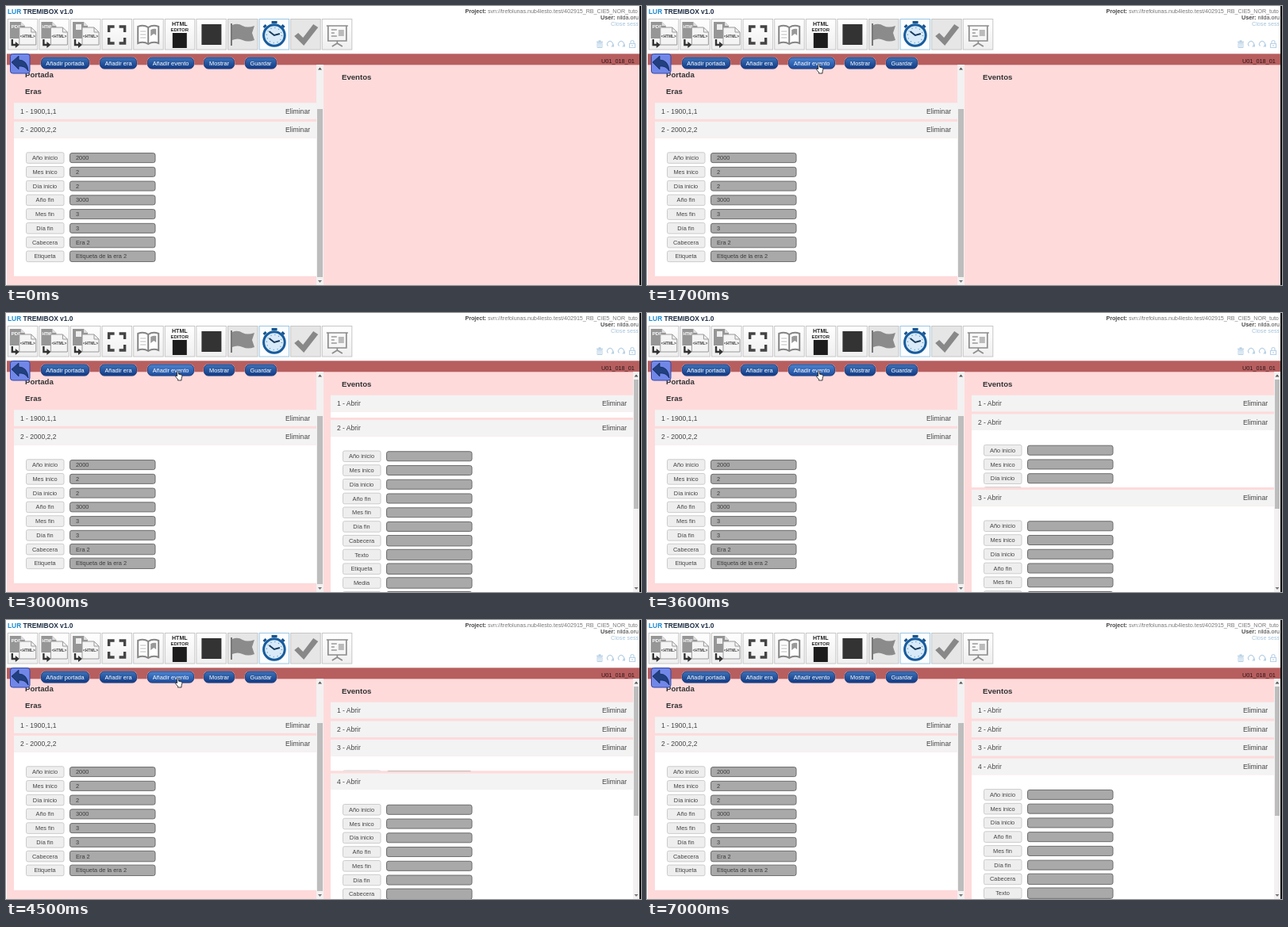
Write an HTML page that moves like this. It is 800 px wide and 352 px high and loops after 7.1 s.

```html
<!DOCTYPE html>
<html lang="es">
<head>
<meta charset="utf-8">
<title>Editor de eventos</title>
<style>
  html, body { margin: 0; width: 100%; height: 100%; overflow: hidden; background: #fff; }
  svg { font-family: "Liberation Sans", Arial, sans-serif; }
  #stage { display: block; }
</style>
</head>
<body>
<svg id="stage" width="800" height="352" viewBox="0 0 800 352">
  <defs>
    <linearGradient id="btn" x2="0" y2="1">
      <stop offset="0" stop-color="#3f73b8"/><stop offset="1" stop-color="#103a85"/>
    </linearGradient>
    <linearGradient id="hover" x2="0" y2="1">
      <stop offset="0" stop-color="#4d84d0"/><stop offset="1" stop-color="#1c4c9c"/>
    </linearGradient>
    <linearGradient id="tile" x2="0" y2="1">
      <stop offset="0" stop-color="#fff"/><stop offset="1" stop-color="#efefef"/>
    </linearGradient>
  </defs>
  <g id="base"></g>
  <g id="live"></g>
  <rect x="798" width="2" height="352" fill="#111"/>
</svg>
<script>
const LOOP = 7100;
const PITCH = 23.6, ROW = 17.75, OPEN = 245, SLIDE = 350;
const ADDED = [1740, 2729, 3455, 4269];
const DATES = ['Año inicio', 'Mes inico', 'Día inicio', 'Año fin', 'Mes fin', 'Día fin', 'Cabecera'];
const ERA = [...DATES, 'Etiqueta'];
const EVENT = [...DATES, 'Texto', 'Etiqueta', 'Media', 'Crédito', 'Leyenda'];
const PATH = [[500, 800, 320], [800, 256, 86], [1000, 222, 75], [1300, 216.5, 73],
  [5250, 216.5, 73], [5600, 409, 4.5], [5800, 436, -16]];

const $ = id => document.getElementById(id);
const rect = (x, y, w, h, fill, more = '') =>
  `<rect x="${x}" y="${y}" width="${w}" height="${h}" fill="${fill}" ${more}/>`;
const text = (x, y, s, size, fill = '#444', more = '') =>
  `<text x="${x}" y="${y}" font-size="${size}" fill="${fill}" ${more}>${s}</text>`;
const path = (d, fill, stroke = 'none', w = 1) =>
  `<path d="${d}" fill="${fill}" stroke="${stroke}" stroke-width="${w}"/>`;
const BOLD = 'font-weight="bold"', MID = 'text-anchor="middle"', BOLD_MID = `${BOLD} ${MID}`;

// cubic-bezier(.25, .1, .25, 1)
function ease(p) {
  if (p <= 0) return 0;
  if (p >= 1) return 1;
  let lo = 0, hi = 1;
  for (let i = 0; i < 24; i++) {
    const m = (lo + hi) / 2;
    .75 * m * (1 - m) + m ** 3 < p ? lo = m : hi = m;
  }
  return .3 * lo * (1 - lo) ** 2 + 3 * lo * lo * (1 - lo) + lo ** 3;
}

function form(labels, values = []) {
  return labels.map((label, i) => {
    const y = 25.2 + i * ROW, h = i > 5 ? 13.4 : 12;
    return rect(15.5, y - 6.8, 47.5, 13.6, '#eee', 'rx="2" stroke="#c8c8c8" stroke-width=".9"') +
      text(39, y + 2.6, label, 7.4, '#444', MID) +
      rect(70.5, y - h / 2, 107.5, h, '#a9a9a9', 'rx="2.5" stroke="#6c6c6c"') +
      text(78, y + 2.6, values[i] ?? '', 7.4, '#3c3c3c');
  }).join('');
}

// Accordion entry; y is the top of its heading, h the visible body height.
function item(x, y, title, h, body) {
  const head = rect(x, y, 381, 20.6, '#f3f3f3') +
    text(x + 8, y + 13.4, title, 8.5) + text(x + 342, y + 13.4, 'Eliminar', 8.6);
  if (h < .1) return head;
  return head + `<svg x="${x}" y="${y + 20.6}" width="381" height="${h}">` +
    rect(0, 0, 381, h, '#fff') + body + '</svg>';
}

function scrollbar(x, w, top, h) {
  const c = x + w / 2;
  return rect(x, 74, w, 278, '#f3f1f1') + rect(x + 1, top, w - 2, h, '#bdbdbd') +
    path(`M${c - 2.5} 80.5h5l-2.5 -3z`, '#555') + path(`M${c - 2.5} 346h5l-2.5 3z`, '#777');
}

function button(x, w, label, fill = 'url(#btn)') {
  return rect(x - .3, 64.2, w + .6, 15.6, '#cfb0bd', 'rx="6.3"') +
    rect(x + .5, 65, w - 1, 14, fill, 'rx="5.5" stroke="#1c4284"') +
    text(x + w / 2, 74.8, label, 7.4, '#fff', MID);
}

// Toolbar icons, each in a 38 x 39 box.
const doc = mark =>
  path('M3 4h14l5 5v16h-19z', '#969696') + path('M17 4v5h5z', '#ddd') + mark +
  path('M15 11h15l6 6v16h-21z', '#f4f4f4', '#999') + path('M30 11v6h6', 'none', '#999') +
  text(25.5, 23.5, '&lt;HTML&gt;', 4.8, '#444', BOLD_MID) +
  path('M6 26v7h5', 'none', '#333', 2.4) + path('M10 29l5 4l-5 4z', '#333');

const ICONS = [
  doc(text(11, 12, 'PDF', 6, '#fff', BOLD_MID)),
  doc(text(11, 12, 'HTML', 5, '#fff', BOLD_MID)),
  doc(rect(7, 7, 7, 7, '#eee')),
  path('M9 17v-7h7M22 10h7v7M29 24v7h-7M16 31h-7v-7', 'none', '#444', 3.4),
  path('M6 10q7 -3 13 1q6 -4 13 -1v21q-7 -3 -13 1q-6 -4 -13 -1z', '#fff', '#858585', 2) +
    path('M19 11v21', 'none', '#858585', 2) +
    path('M22 14q4 -2 7 -1v8l-3 -2l-4 3z', '#999') + path('M9 16h7M9 20h7M9 24h7', 'none', '#bbb'),
  text(19, 9, 'HTML', 7, '#222', BOLD_MID) +
    text(19, 15.5, 'EDITOR', 6, '#222', BOLD_MID) + rect(10, 18, 18, 19, '#1c1c1c'),
  rect(7, 7, 25, 26, '#333'),
  path('M5 6v28', 'none', '#777', 2) +
    path('M6 8q7 -3 13 1q6 3 15 0l-3 9l3 9q-8 3 -15 0q-6 -3 -13 0z', '#8b8b8b'),
  rect(16, 3, 7, 3, '#17558f') + path('M29 8l3 3M9 8l-3 3', 'none', '#17558f', 3) +
    '<circle cx="19.3" cy="21" r="13.3" fill="#d9ebf8" stroke="#175c9d" stroke-width="3"/>' +
    '<circle cx="19.3" cy="21" r="9.5" fill="none" stroke="#609bc9" stroke-width="1.5" stroke-dasharray="1 4"/>' +
    path('M13 16l6.3 5l7 -2', 'none', '#173a5e', 2),
  path('M5 22l5 -4l6 6l13 -17l6 4l-18 23z', '#888'),
  path('M6 9h27M8 9v19h23v-19M19.5 28v4M13 35l6.5 -4l6.5 4', 'none', '#8c8c8c', 1.7) +
    path('M12 14h7M12 18h4M12 22h7', 'none', '#999', 1.4) + rect(21, 14, 7, 8, '#bbb')
];

function tools() {
  return ICONS.map((icon, i) => {
    const on = i === 8, dim = i === 7 || i === 9;
    return `<g transform="translate(${1.8 + i * 39.6} 16)">` +
      rect(.5, .5, 37.5, 38.5, on ? '#fbfdff' : dim ? '#e6e6e6' : 'url(#tile)',
        `stroke="${on ? '#9cc6e2' : '#c6c6c6'}"`) + icon + '</g>';
  }).join('');
}

function smallIcons() {
  const c = '#b9d2e6';
  const turn = x => path(`M${x - 2.5} 50.5a3.5 3.5 0 1 1 5 0`, 'none', c, 1.2) +
    path(`M${x + 1} 51.5h4v-3.5z`, c);
  return path('M744 45.5h8M746.5 44h3', 'none', c, 1.3) +
    path('M745 47h6v5.5h-6zM747 47v5M749 47v5', 'none', c) + turn(761) + turn(775) +
    path('M785.5 47.5h7v5h-7zM787 47v-1.5a2 2 0 0 1 4 0v1.5M789 49v2', 'none', c, 1.2);
}

function backArrow() {
  return rect(5.5, 60.5, 24.5, 24.5, '#7187e8', 'rx="3" stroke="#3348a8"') +
    path('M7 71l9 -8v5q11 0 12 14q-4 -7 -12 -6v4z', '#22407f', '#152b5e', .8);
}

function base() {
  const grey = '#444';
  return rect(0, 0, 800, 352, '#fff') +
    text(2, 10, '<tspan fill="#1b8ad0">LUR</tspan> TREMIBOX v1.0', 8.4, '#1f2f46', BOLD) +
    text(578.5, 8.5, `<tspan ${BOLD}>Project:</tspan> <tspan fill="#777">svn://trefolunas.nub4lesto.test/402915_RB_CIE5_NOR_tuto</tspan>`, 7.1, grey) +
    text(749, 17, `<tspan ${BOLD}>User:</tspan> nilda.oru`, 7.2, grey) +
    text(762, 25.3, 'Close sess', 7.2, '#a5c3da') +
    tools() + smallIcons() +
    rect(1, 74, 797, 278, '#fedadb') + rect(1, 60.3, 797, 14, '#b75e5f') +
    text(24, 90.3, 'Portada', 9.6, '#333', BOLD) +
    text(24, 111.3, 'Eras', 9.6, '#333', BOLD) +
    text(423, 93, 'Eventos', 9.6, '#333', BOLD) +
    text(750, 72.3, 'U01_018_01', 7.3, '#2b1717') +
    item(10, 122.2, '1 - 1900,1,1', 0) +
    item(10, 122.2 + PITCH, '2 - 2000,2,2', 174.5,
      form(ERA, [2000, 2, 2, 3000, 3, 3, 'Era 2', 'Etiqueta de la era 2'])) +
    scrollbar(391, 9, 130, 212) + backArrow() +
    button(44, 61, 'Añadir portada') + button(118, 47, 'Añadir era') +
    button(249, 39, 'Mostrar') + button(301, 40, 'Guardar');
}

const eventForm = form(EVENT);

function events(t) {
  if (t < ADDED[0]) return '';
  const shown = i => ease((t - ADDED[i]) / SLIDE);
  let y = 103.8, out = '';
  ADDED.forEach((start, i) => {
    if (t < start) return;
    const closing = i + 1 < ADDED.length ? shown(i + 1) : 0;
    const h = OPEN * shown(i) * (1 - closing);
    out += item(409, y, `${i + 1} - Abrir`, h, eventForm);
    y += PITCH + h;
  });
  return out + scrollbar(790, 8, 84, 163);
}

function pointer(t) {
  const k = PATH.findIndex(p => p[0] > t);
  if (k < 1) return null;
  const [t0, x0, y0] = PATH[k - 1], [t1, x1, y1] = PATH[k];
  const p = (t - t0) / (t1 - t0);
  return [x0 + (x1 - x0) * p, y0 + (y1 - y0) * p];
}

const ARROW = path('M0 0v9.5l2.2 -2l1.6 3.6l1.6 -.7l-1.6 -3.5h3z', '#fff', '#111', .8);
const HAND = path('M-.9 6.5v-5.6q.9 -1.6 1.8 0v3.2l3.8 1q.9 .4 .7 1.6l-.9 3.3v2h-4.5v-1.4l-3 -3.4q-.2 -1.6 1.2 -.8z',
  '#fff', '#111', .8);

function draw(now) {
  const t = now % LOOP;
  const at = pointer(t);
  const over = at && at[0] > 178 && at[0] < 237 && at[1] > 64 && at[1] < 80;
  $('live').innerHTML = events(t) +
    button(178, 59, 'Añadir evento', over ? 'url(#hover)' : 'url(#btn)') +
    (at ? `<g transform="translate(${at})">${over ? HAND : ARROW}</g>` : '');
  requestAnimationFrame(draw);
}

$('base').innerHTML = base();
draw(0);
</script>
</body>
</html>
```
